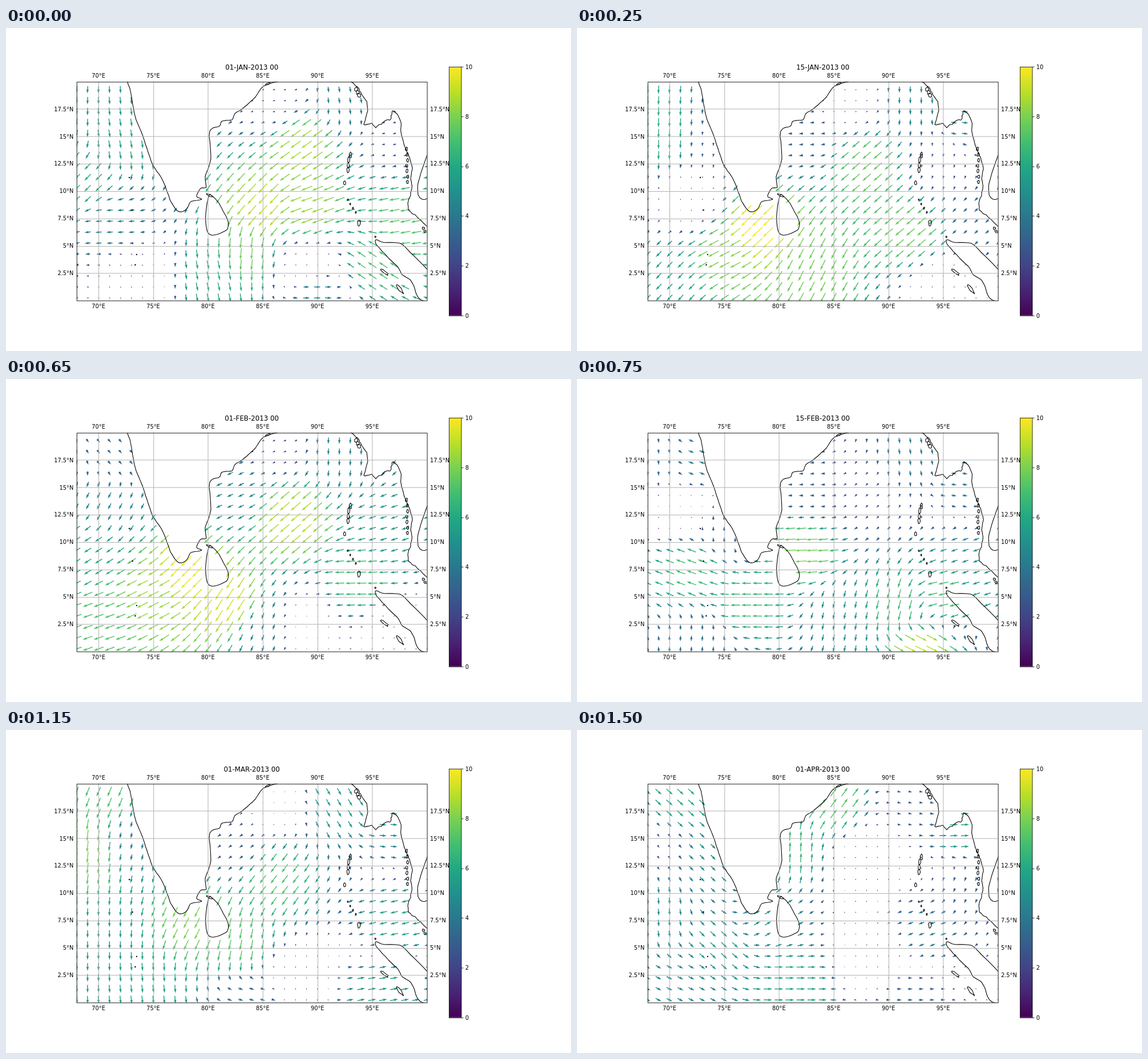
These frames come from a looping animation (990x566 px, 1.75 s). An HTML page with a canvas:

```html
<!DOCTYPE html>
<html lang="en">
<head>
<meta charset="utf-8">
<title>Wind over the bay</title>
<style>
html, body { margin: 0; width: 100%; height: 100%; overflow: hidden; background: #fff }
canvas { display: block }
</style>
</head>
<body>
<canvas id="stage" width="990" height="566"></canvas>
<script>
const g = document.getElementById('stage').getContext('2d');
const HOLD = 250, PX_PER_SPEED = 2.6, SHAFT = 1.5;

// The figure is laid out at 1008 x 576 and scaled to the stage.
const SX = 990 / 1008, SY = 566 / 576;
const DEG = 19.53, LEFT = 126, TOP = 95.58, WIDTH = 32 * DEG, HEIGHT = 20 * DEG;
const lonX = lon => LEFT + (lon - 68) * DEG;
const latY = lat => TOP + (20 - lat) * DEG;

// Key gusts of each day: [column, row, eastward speed, downward speed].
const days = {
  '01-JAN-2013 00': [
    [4,5,1,5.6], [1,8.5,-4.5,4.5], [3,12,-4.5,.2], [5,17,-.7,-.8], [13,17,1.4,6], [18,1,-1.6,.4],
    [25,1,.8,4.3], [20.5,5,-7.2,5], [29,4,-2.2,.5], [17,11,-6,6.8], [21,11,-8,2.8],
    [15.5,15,-.8,7.8], [30,12,-7.2,1.3], [21,16,-1,.2], [22,18.5,4.8,0], [27,16,-6,-4]],
  '15-JAN-2013 00': [
    [1.5,4,-.2,6.4], [6,5,-.3,2.4], [4,10,-.3,.4], [10,12.5,-7.2,7], [7,15,-7.2,3.8], [2,18,-3.8,4.2],
    [15,16,-3.5,7], [18,1,-1,.2], [25,1,0,4.6], [14,4,-3,.3], [20,7,-5.8,5],
    [24,13,-6,5], [27,7,-.6,2.2], [29.5,3,4.5,.4], [30,12,-2.6,2.4], [27,18,.3,.1]],
  '01-FEB-2013 00': [
    [4,1.5,2.2,2.4], [3,6,-2.2,4.2], [1,10,-5,3.2], [10,12,-6.8,7], [7,14,-7.6,3.8], [2,16.5,-6.8,2.4],
    [14,15,-5,8], [18,.5,-1.8,.8], [24,1,-.2,4.5], [14,5,-4.2,2], [19.5,7,-6.8,5.8],
    [29,8,-5,1.6], [26,13,-7,.2], [17,17,-1.5,4], [21,17,-.6,-.3], [29,17,.3,-.2]],
  '15-FEB-2013 00': [
    [1,2,.3,3.3], [4.5,2,4,1.4], [3,6,.6,.3], [7,8,.1,-3.2], [4,11.5,-6.5,-2.4], [9,15,-6.8,0],
    [5,18.5,.3,-3.8], [14,10,-8,.5], [15,5,-3,.2], [20,5,-1.6,1.6], [24,1.5,.7,4.1],
    [29,4,3.6,.5], [17.5,16,-1,4.8], [23,15,-1.8,6.8], [27,14,-7,1.5], [25,19,8,4], [29,11,-4.6,1.6]],
  '01-MAR-2013 00': [
    [3,1,-2.8,6.6], [1,5,-.8,8], [5,4,-.8,3.8], [2,14,0,5.3], [6,18,.6,5.7], [11,12,-3.6,7.2],
    [15,14,-1.4,7.2], [18,1,-.6,.2], [24,1,2.8,4.8], [14,5,-2.3,1.6], [18,8,-4.3,5.8],
    [29.5,3,4.8,.3], [29,12,-5.4,1.2], [20,17,-.1,.2], [16,19,3.6,1], [28,18,5.5,-1]],
  '15-MAR-2013 00': [
    [1,1,1.6,4.6], [5,2.5,4.4,8.2], [1.5,5,.1,7], [1,9,-3.2,5], [6,10,-.4,1.2], [4,17,-3.6,2.4],
    [12,17,-4.2,.6], [16,11,-5,1.6], [13,5,-2.4,-3.2], [17,1,2.6,-3.4], [21,4,0,.3],
    [26,1,2.6,3], [29.5,4,3.8,.2], [25.5,14,-5.6,4.2], [28,10,-3.6,1.8], [31,19,5,-.8]],
  '01-APR-2013 00': [
    [3,1,4.4,4], [1,5,1.4,1.8], [6,6,3.4,3.4], [1,11,.4,4.8], [7,14,4,3.8], [11,11.5,4.2,-2.5],
    [3,18,4,2], [13,18,6,0], [13,5,.3,-6.6], [17,1,4.3,-6], [20,6,0,.1],
    [24,1,2.5,.6], [29,3.5,5.6,-.3], [29,9,-1.2,2.8], [25.5,12.5,-4,1.5], [21,15,-.6,.8], [24,19,3.4,0]]
};
const dates = Object.keys(days);

let seed = 7;
const noise = () => (seed = seed * 16807 % 2147483647) / 2147483647 * 2 - 1;

// Smooth subdivision of key points with a little seeded roughness.
function refine(pts, rough, times = 2) {
  if (!times) return pts;
  const out = [];
  pts.forEach((b, i) => {
    out.push(b);
    const c = pts[i + 1];
    if (!c) return;
    const a = pts[i - 1] || b, d = pts[i + 2] || c;
    out.push([0, 1].map(k => (9 * (b[k] + c[k]) - a[k] - d[k]) / 16 + noise() * rough));
  });
  return refine(out, rough * .7, times - 1);
}

// Coasts are key points in stage pixels; their closed outlines mark the land.
const coast = new Path2D(), land = new Path2D();
function shore(keys, rough, corner) {
  const pts = [];
  for (let i = 0; i < keys.length; i += 2) pts.push([keys[i], keys[i + 1]]);
  const line = refine(pts, rough);
  line.forEach(([x, y], i) => {
    coast[i ? 'lineTo' : 'moveTo'](x, y);
    land[i ? 'lineTo' : 'moveTo'](x, y);
  });
  if (corner) land.lineTo(...corner);
  land.closePath();
}
shore([213,94, 217,106, 219,116, 222,134, 228,161, 237,182, 247,211, 257,240, 272,262, 284,291,
  288,303, 299,319, 308,322, 318,315, 324,304, 343,300, 334,295, 341,281, 351,279, 349,260, 359,229,
  356,190, 361,176, 374,172, 379,163, 396,161, 401,150, 417,139, 437,121, 451,102, 476,94], .5);
shore([357,291, 370,303, 381,322, 389,338, 388,352, 377,359, 361,363, 352,354, 350,326, 353,304, 357,291], .4);
shore([603,94, 617,104, 623,116, 633,136, 627,169, 640,167, 648,175, 655,169, 665,162, 675,158,
  678,145, 690,160, 693,188, 704,222, 711,240, 709,264, 711,282, 705,303, 705,319, 721,332, 738,348],
  1.8, [738, 94]);
shore([738,222, 729,248, 722,272, 722,292, 729,300, 738,299], .4);
shore([738,423, 709,394, 690,377, 664,376, 648,371, 650,381, 670,403, 686,418, 695,433, 709,442,
  717,460, 724,474, 734,479], .6);

// A row of n ragged islets from one point to another.
function islets(n, x0, y0, x1, y1, rx, ry, tilt = 0) {
  for (let i = 0; i < n; i++) {
    const t = n > 1 ? i / (n - 1) : 0;
    const x = x0 + (x1 - x0) * t + noise(), y = y0 + (y1 - y0) * t;
    for (let k = 0; k < 9; k++) {
      const a = k * Math.PI / 4.5, r = 1 + noise() * .3;
      const dx = Math.cos(a) * rx * r, dy = Math.sin(a) * ry * r;
      coast[k ? 'lineTo' : 'moveTo'](
        x + dx * Math.cos(tilt) - dy * Math.sin(tilt),
        y + dx * Math.sin(tilt) + dy * Math.cos(tilt));
    }
    coast.closePath();
  }
}
islets(4, 603, 223, 599, 249, 1.8, 5);
islets(1, 593, 272, 593, 272, 2, 3.5);
islets(4, 599, 301, 612, 323, 1, 1.6);
islets(1, 618, 342, 618, 342, 2.5, 5);
islets(7, 702, 212, 704, 270, 1.8, 3);
islets(3, 614, 107, 619, 118, 3, 3);
islets(2, 732, 351, 734, 356, 2, 2);
islets(2, 216, 262, 221, 319, .7, .7);
islets(2, 229, 397, 227, 415, .7, .7);
islets(1, 647, 366, 647, 366, 1.2, 1);
islets(1, 357, 293, 357, 293, 5, 1.5, .4);
islets(1, 458, 98, 458, 98, 4, 1.5, -.5);
islets(1, 663, 428, 663, 428, 7.5, 2, .6);
islets(1, 690, 457, 690, 457, 10, 3, .9);

const sea = [];
for (let r = 0; r < 20; r++)
  for (let c = 0; c < 33; c++) {
    const x = lonX(68 + c), y = latY(19.25 - r);
    if (!g.isPointInPath(land, x * SX, y * SY, 'evenodd')) sea.push({ c, r, x, y });
  }

const viridis = ['440154', '482475', '414487', '355f8d', '2a788e', '21918c',
  '22a884', '44bf70', '7ad151', 'bddf26', 'fde725'];
function color(speed) {
  const s = Math.min(speed, 9.999), i = Math.floor(s);
  const [a, z] = [viridis[i], viridis[i + 1]].map(h => parseInt(h, 16));
  return `rgb(${[16, 8, 0].map(b =>
    Math.round((a >> b & 255) * (1 - s + i) + (z >> b & 255) * (s - i)))})`;
}

// Inverse-distance blend of the gusts.
function windAt(gusts, c, r) {
  let u = 0, v = 0, sum = 0;
  for (const [gc, gr, gu, gv] of gusts) {
    const w = 1 / ((gc - c) ** 2 + (gr - r) ** 2 + .6) ** 2;
    u += w * gu;
    v += w * gv;
    sum += w;
  }
  return [u / sum, v / sum];
}

function arrow(x, y, [u, v]) {
  const speed = Math.hypot(u, v), len = speed * PX_PER_SPEED;
  g.save();
  g.translate(x, y);
  g.rotate(Math.atan2(v, u));
  g.fillStyle = color(speed);
  g.beginPath();
  if (len < SHAFT) {
    g.arc(0, 0, SHAFT / 2, 0, 7);
  } else {
    const k = SHAFT * Math.min(1, len / (5 * SHAFT)), tip = len / 2;
    const neck = tip - 4.5 * k, barb = tip - 5 * k;
    g.moveTo(-tip, -k / 2);
    g.lineTo(neck, -k / 2);
    g.lineTo(barb, -1.5 * k);
    g.lineTo(tip, 0);
    g.lineTo(barb, 1.5 * k);
    g.lineTo(neck, k / 2);
    g.lineTo(-tip, k / 2);
  }
  g.fill();
  g.restore();
}

function text(s, x, y, align, size = 10) {
  g.font = `${size}px "DejaVu Sans", sans-serif`;
  g.textAlign = align;
  g.fillStyle = '#000';
  g.fillText(s, x, y);
}

function drawMap(date) {
  g.save();
  g.beginPath();
  g.rect(LEFT, TOP, WIDTH, HEIGHT);
  g.clip();
  for (const { c, r, x, y } of sea) arrow(x, y, windAt(days[date], c, r));
  g.setTransform(1, 0, 0, 1, 0, 0);
  g.strokeStyle = '#000';
  g.lineWidth = 1.1;
  g.lineJoin = 'round';
  g.stroke(coast);
  g.restore();

  const lines = [];
  for (let lon = 70; lon < 100; lon += 5) {
    const x = lonX(lon);
    lines.push([Math.round(x), TOP, 1, HEIGHT]);
    for (const y of [89, 499.7]) text(lon + '°E', x, y, 'center');
  }
  for (let lat = 2.5; lat < 20; lat += 2.5) {
    const y = latY(lat);
    lines.push([LEFT, Math.round(y), WIDTH, 1]);
    text(lat + '°N', 120.5, y + 3.7, 'right');
    text(lat + '°N', 756.5, y + 3.7, 'left');
  }
  g.fillStyle = '#b0b0b0';
  for (const line of lines) g.fillRect(...line);
  g.strokeStyle = '#000';
  g.lineWidth = .9;
  g.strokeRect(126.5, 96.5, 625, 390);
  text(date, LEFT + WIDTH / 2, 74.3, 'center', 12);
}

function drawScale() {
  const x = 790.5, w = 22, top = 69.12, h = 443.52;
  const ramp = g.createLinearGradient(0, top + h, 0, top);
  viridis.forEach((c, i) => ramp.addColorStop(i / 10, '#' + c));
  g.fillStyle = ramp;
  g.fillRect(x, top, w, h);
  g.strokeStyle = '#000';
  g.lineWidth = .8;
  g.strokeRect(x, 69.5, w, 444);
  for (let n = 0; n <= 10; n += 2) {
    const y = top + h * (1 - n / 10);
    g.fillStyle = '#000';
    g.fillRect(x + w, Math.round(y), 3.5, .8);
    text(n, x + w + 7, y + 3.9, 'left');
  }
}

let shown = -1;
function tick(now) {
  const i = Math.floor(now / HOLD) % dates.length;
  if (i !== shown) {
    shown = i;
    g.setTransform(SX, 0, 0, SY, 0, 0);
    g.fillStyle = '#fff';
    g.fillRect(0, 0, 1008, 576);
    drawMap(dates[i]);
    drawScale();
  }
  requestAnimationFrame(tick);
}
tick(performance.now());
</script>
</body>
</html>
```
